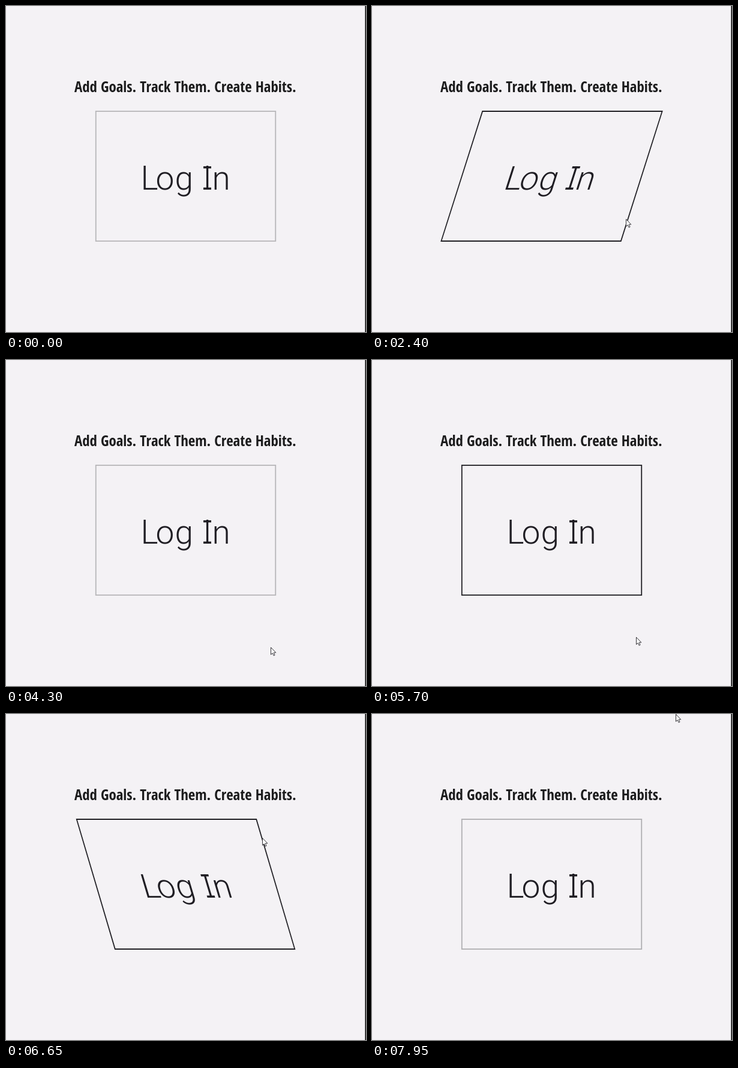
These frames come from a looping animation (600x545 px, 8000 ms). An HTML page:

```html
<!DOCTYPE html>
<html lang="en">
<head>
<meta charset="utf-8">
<title>Log In</title>
<style>
  html, body { margin: 0; width: 100%; height: 100%; overflow: hidden; background: #f4f2f5; }
  svg { display: block; width: 600px; height: 545px; }
  #title { font-weight: 700; fill: #1c1c1d; }
  #label { font: 300 55px Roboto, "Noto Sans", sans-serif; fill: #1f1d23; }
</style>
</head>
<body>
<svg viewBox="0 0 600 545">
  <rect width="600" height="545" fill="#f4f2f5"/>
  <rect x="598.5" width="1.5" height="545" fill="#080808"/>
  <text id="title" x="114" y="143.5">Add Goals. Track Them. Create Habits.</text>
  <g id="button">
    <rect id="frame" x="149.75" y="176" width="299.5" height="217" fill="none" stroke-width="1.8"/>
    <text id="label" y="307" x="224.5 249.5 281.5 313 328.3 343.5">Log In</text>
    <path d="M329 269.7h13M329 305.2h13" stroke="#1f1d23" stroke-width="3.4"/>
  </g>
  <path id="cursor" d="M.5.5V12.6L3.2 10 5.1 14.2 7 13.4 5.2 9.2H8.8Z" fill="#fff" stroke="#353439"/>
</svg>
<script>
const LOOP = 8000;
const PULSE = 4000;
const WOBBLE = 1200;
const CENTER = { x: 299.5, y: 284.5 };
const DARK = [31, 30, 35];
const GRAY = [183, 182, 185];

// Spans during which the pointer is over the button
const hovers = [[1950, 3150], [5914, 6900]];

// Pointer tip: time, x, y
const track = [
  [1650, 454, 494], [1800, 451, 449], [1950, 443, 393], [2250, 425, 355],
  [2850, 418, 360], [3150, 432, 396], [3300, 438, 455], [3500, 441, 480],
  [5650, 441, 480], [5914, 436, 393], [6300, 418, 245], [6600, 422, 210],
  [6850, 446, 195], [7000, 467, 176], [7350, 506, 0], [8000, 506, 0]
];

const el = id => document.getElementById(id);
const [title, button, frame, cursor] = ["title", "button", "frame", "cursor"].map(el);
const mix = (a, b, u) => a + (b - a) * u;
const smooth = (from, to, t) => {
  const u = Math.min(1, Math.max(0, (t - from) / (to - from)));
  return u * u * (3 - 2 * u);
};

// Choose the installed condensed face whose natural size suits the headline
function fitTitle(width, idealSize) {
  const families = ["Open Sans Condensed", "Roboto Condensed", "Liberation Sans Narrow",
    "Open Sans", "Roboto", "Noto Sans"];
  let best = null;
  for (const family of families) {
    for (const stretch of ["75%", "62.5%"]) {
      title.style.fontFamily = `"${family}", sans-serif`;
      title.style.fontStretch = stretch;
      title.style.fontSize = "100px";
      const size = 100 * width / title.getComputedTextLength();
      const miss = Math.abs(size - idealSize);
      if (!best || miss < best.miss) best = { family, stretch, size, miss };
    }
  }
  title.style.fontFamily = `"${best.family}", sans-serif`;
  title.style.fontStretch = best.stretch;
  title.style.fontSize = best.size + "px";
}

function pointerAt(t) {
  const i = track.findIndex(point => t < point[0]);
  if (i < 1) return null;
  const [a, b] = [track[i - 1], track[i]];
  const u = (t - a[0]) / (b[0] - a[0]);
  return [mix(a[1], b[1], u), mix(a[2], b[2], u)];
}

function skewAt(t) {
  const hover = hovers.find(([from, to]) => t >= from && t < to);
  return hover ? -25 * Math.sin(2 * Math.PI * (t - hover[0]) / WOBBLE) : 0;
}

function render(t) {
  const phase = t % PULSE;
  const darkness = smooth(300, 1000, phase) * (1 - smooth(3350, 4050, phase));
  frame.setAttribute("stroke", `rgb(${GRAY.map((g, i) => Math.round(mix(g, DARK[i], darkness)))})`);

  const { x, y } = CENTER;
  button.setAttribute("transform",
    `translate(${x} ${y}) skewX(${skewAt(t).toFixed(3)}) translate(${-x} ${-y})`);

  const tip = pointerAt(t);
  cursor.setAttribute("visibility", tip ? "visible" : "hidden");
  if (tip) cursor.setAttribute("transform", `translate(${tip.map(Math.round)})`);
}

function tick() {
  render(performance.now() % LOOP);
  requestAnimationFrame(tick);
}

fitTitle(370, 25);
tick();
</script>
</body>
</html>
```
